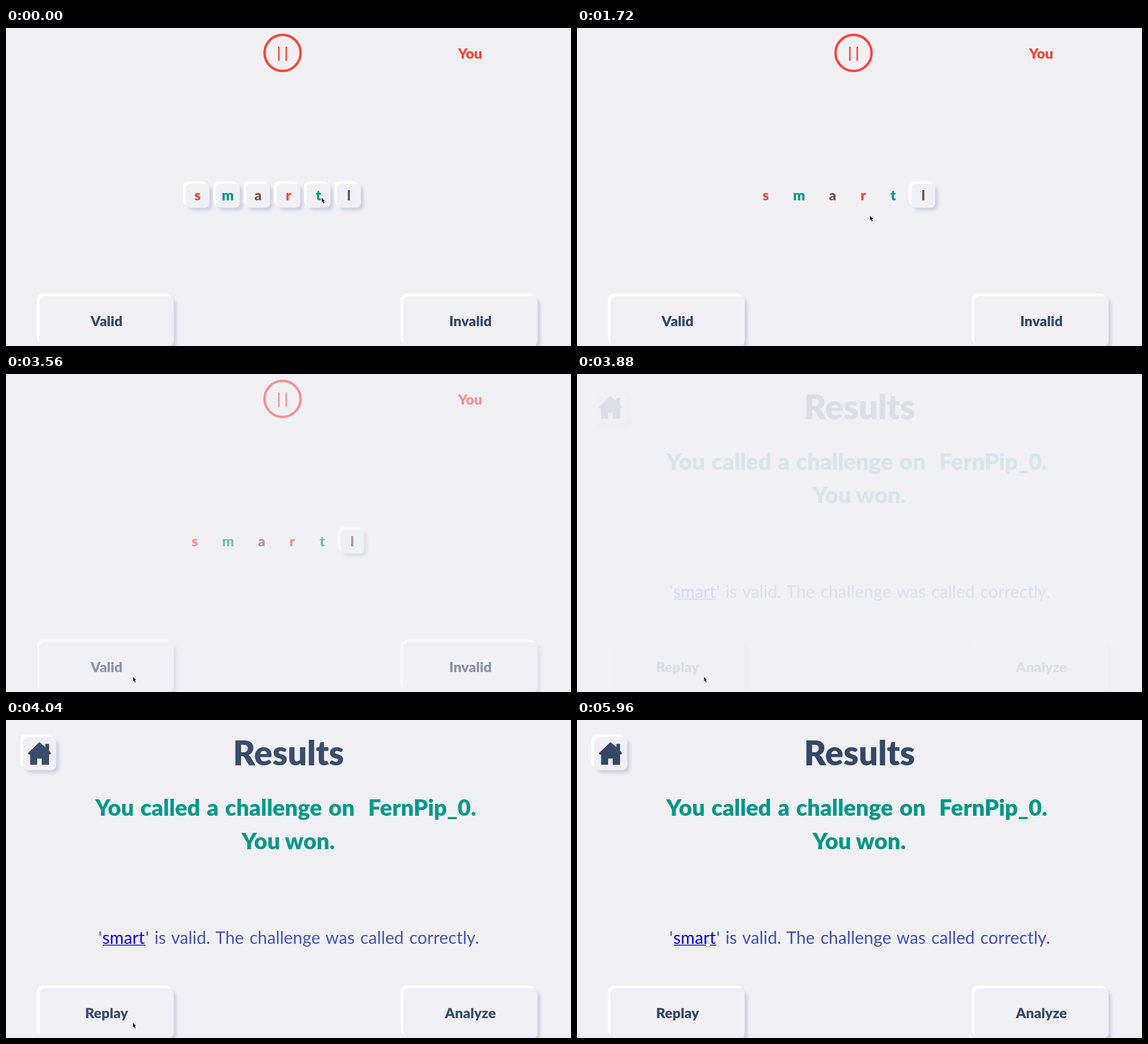
These frames come from a looping animation (997x561 px, 6480 ms). An HTML page:

```html
<!DOCTYPE html>
<html lang="en">
<head>
<meta charset="utf-8">
<title>Word challenge</title>
<style>
  html, body { margin: 0; width: 100%; height: 100%; overflow: hidden; background: #f0eff4; }
  svg { display: block; width: 100%; height: 100%; }
  text { font-family: Lato, "Open Sans", sans-serif; font-weight: 900; text-anchor: middle; white-space: pre; }
  .left { text-anchor: start; word-spacing: .06em; }
  .note { font-weight: 400; letter-spacing: .004em; word-spacing: .067em; }
  .shade { fill: #cdd1de; filter: blur(2.6px); }
  .light { fill: #fff; filter: blur(.6px); }
  .face { fill: #f0eff4; }
</style>
</head>
<body>
<svg id="stage" viewBox="0 0 997 561"></svg>
<script>
const LOOP = 6480;
const NAVY = '#344966', RED = '#f44336', TEAL = '#009688', BROWN = '#795548', INDIGO = '#3f51b5', LINK = '#0b00dd';
const stage = document.getElementById('stage');

const label = (str, x, y, size, fill, cls = '') =>
  `<text x="${x}" y="${y}" font-size="${size}" fill="${fill}" class="${cls}">${str}</text>`;

const raised = (x, y, w, h, r = 8) => [['shade', 5], ['light', -4.5], ['face', 0]].map(([cls, d]) =>
  `<rect class="${cls}" x="${x + d}" y="${y + d}" width="${w}" height="${h}" rx="${r}"/>`).join('');

const button = (str, x) => raised(x, 473, 237, 89, 10) + label(str, x + 118.5, 526, 25, NAVY);

const word = [...'smartl'];
const inks = [RED, TEAL, BROWN];
const letter = (c, i, x) => label(c, x, 304, 25, inks[i % 3]);

const tiles = word.map((c, i) => {
  const x = 317 + i * 53.4;
  return raised(x, 275, 42, 42) + letter(c, i, x + 21);
}).join('');

const flatX = [333, 392, 451, 505, 558, 611];
const picked = raised(590, 275, 42, 42) + word.map((c, i) => letter(c, i, flatX[i])).join('');

const home = raised(30, 30, 58.5, 58.5, 9) +
  `<path fill="${NAVY}" stroke="${NAVY}" stroke-linejoin="round"
    d="M59 39.5L70 49V42.5H75.5V54L79 58.5L77.5 60.5H75.5V78.5H63.5V67.5H54.5V78.5H43V60.5H40.5L39 58.5Z"/>`;

stage.innerHTML = `
  <g id="game">
    <g fill="none" stroke="${RED}">
      <circle cx="488" cy="44" r="31.8" stroke-width="4.2"/>
      <path d="M481.5 33V58M494.5 33V58" stroke-width="2.5"/>
    </g>
    ${label('You', 819, 54, 25, RED)}
    <g id="tiles">${tiles}</g>
    <g id="picked">${picked}</g>
    ${button('Valid', 59)}${button('Invalid', 701)}
  </g>
  <g id="results">
    ${home}
    ${label('Results', 498.5, 80, 60, NAVY)}
    ${label('You called a challenge on', 157.5, 169, 40, TEAL, 'left')}
    ${label('FernPip_0.', 639, 169, 40, TEAL, 'left')}
    ${label('You won.', 498, 228, 40, TEAL)}
    ${label("'", 163, 395, 30, INDIGO, 'left note')}
    ${label('smart', 170, 395, 30, LINK, 'left note')}
    <path d="M171 397.3H246" stroke="${LINK}" stroke-width="1.6"/>
    ${label("' is valid. The challenge was called correctly.", 246, 395, 30, INDIGO, 'left note')}
    ${button('Replay', 59)}${button('Analyze', 701)}
  </g>
  <g id="cursor">
    <path id="arrow" d="M0 0V8.5L1.8 6.9L3.4 10.5L5 9.8L3.5 6.3H6Z" fill="#000" stroke="#fff" stroke-width=".5"/>
    <path id="hand" d="M-1 .5Q0 -1 1 .5V3.5L4.5 4.5Q5.5 5 5 7L4 10H-1L-3.5 6.5Q-3.5 5 -1.5 6Z" fill="#fff" stroke="#888" stroke-width=".8"/>
  </g>`;

const parts = Object.fromEntries(
  ['game', 'tiles', 'picked', 'results', 'cursor', 'arrow', 'hand'].map(id => [id, document.getElementById(id)]));

// time, x, y of the pointer tip
const path = [
  [480, 557, 299], [880, 338, 300], [1240, 338, 300], [1560, 556, 302],
  [1720, 517, 331], [2300, 260, 495], [2680, 690, 484], [2840, 637, 488],
  [3240, 224, 534], [4520, 224, 534], [4680, 239, 531], [5160, 262, 450],
  [5680, 230, 390]
];

const clamp = v => Math.min(1, Math.max(0, v));
const smooth = v => v * v * (3 - 2 * v);
const ramp = (t, from, to) => smooth(clamp((t - from) / (to - from)));

function pointer(t) {
  let [, x, y] = path[0];
  for (let i = 1; i < path.length; i++) {
    const [t0, x0, y0] = path[i - 1], [t1, x1, y1] = path[i];
    const k = ramp(t, t0, t1);
    x += (x1 - x0) * k;
    y += (y1 - y0) * k;
  }
  return [x, y];
}

const show = (node, on) => { node.style.display = on ? '' : 'none'; };

function draw(t) {
  const [x, y] = pointer(t);
  const onLink = t > 4400 && y < 401 && x > 170 && x < 247;
  const chosen = t >= 1520;
  parts.game.setAttribute('opacity', 1 - ramp(t, 3420, 3720));
  parts.results.setAttribute('opacity', ramp(t, 3836, 4062));
  show(parts.tiles, !chosen);
  show(parts.picked, chosen);
  parts.cursor.setAttribute('transform', `translate(${x.toFixed(2)} ${y.toFixed(2)})`);
  show(parts.arrow, !onLink);
  show(parts.hand, onLink);
}

const start = performance.now();
function tick() {
  draw((performance.now() - start) % LOOP);
  requestAnimationFrame(tick);
}
tick();
</script>
</body>
</html>
```
